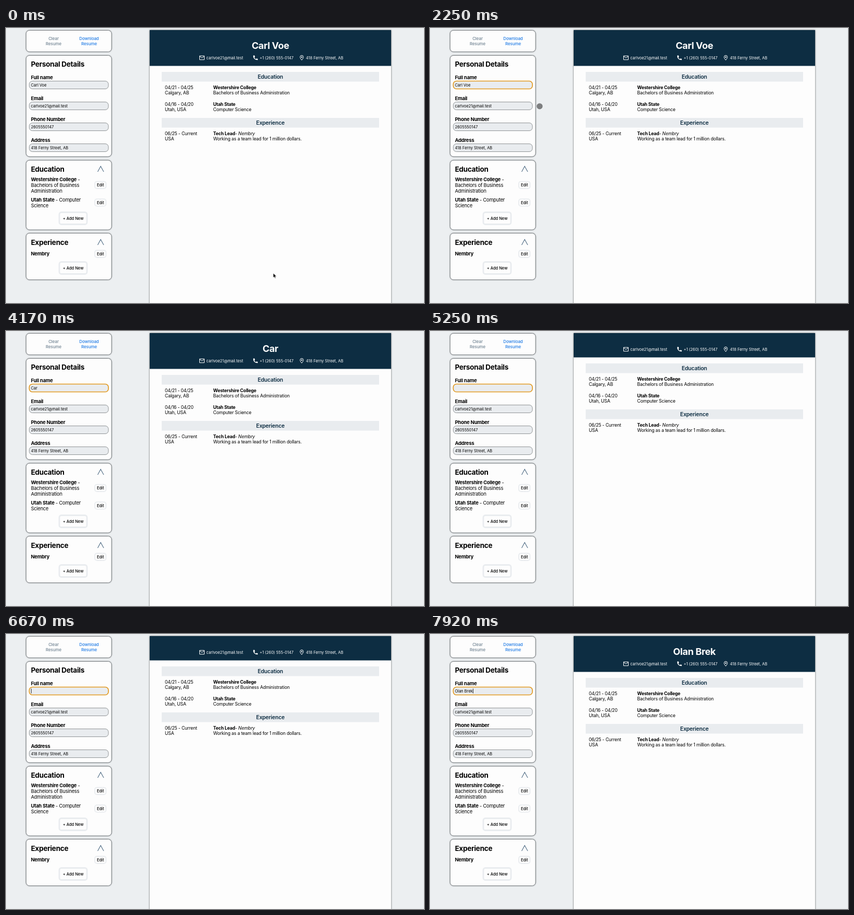
An HTML page that plays this animation: 800 px wide and 526 px high, repeating every 8 s.

```html
<!DOCTYPE html>
<html lang="en">
<head>
<meta charset="utf-8">
<title>Resume builder</title>
<style>
  html, body { margin: 0; width: 100%; height: 100%; overflow: hidden; background: #eceff1; }
  svg { display: block; width: 800px; height: 526px; }
  text { font: 8.7px Inter, sans-serif; letter-spacing: -.02em; font-optical-sizing: none; fill: #000; }
  b, .b { font-weight: 700; }
  .mid { text-anchor: middle; }
  .title { font-size: 13.5px; font-weight: 700; }
  .label { font-size: 9.35px; font-weight: 700; }
  .item { font-size: 9.2px; }
  .small { font-size: 7.45px; letter-spacing: 0; }
  .button { font-size: 7.5px; font-weight: 500; letter-spacing: 0; text-anchor: middle; }
  .action { font-size: 7.95px; font-weight: 500; letter-spacing: -.01em; text-anchor: middle; }
  .section { font-size: 10.4px; font-weight: 600; text-anchor: middle; fill: #0d2d42; }
  #heading { font-size: 18px; font-weight: 700; text-anchor: middle; fill: #fff; }
  .contact text { fill: #fff; }
  .card { fill: #fdfdfd; stroke: #7d8286; filter: drop-shadow(0 .5px 1px #0006); }
  .field { fill: #e9ecef; stroke: #85898c; stroke-width: .9; }
  .focused { stroke: #e29a22; stroke-width: 1.7; }
  .line { fill: none; stroke: #4d6a83; stroke-width: 1.1; }
  .icon { fill: none; stroke: #fff; stroke-width: 1; }
</style>
</head>
<body>
<svg viewBox="0 0 800 526">
  <g id="sidebar"></g>

  <rect x="275" y="4" width="462" height="540" fill="#fdfdfd" style="filter:drop-shadow(0 0 1.6px #000a)"/>
  <rect id="banner" x="275" y="4" width="462" height="68.5" fill="#0d2d42"/>
  <text id="heading" x="506" y="40"></text>

  <g id="content">
    <g class="contact">
      <path class="icon" d="M370.5 53.3h9v7.4h-9zM370.5 54.2l4.5 3 4.5-3"/>
      <path fill="#fff" d="M473.3 52.6h2.4l.8 2.6-1.3 1.3q1 2 3 3l1.3-1.3 2.3.7v2.4q-4 .3-6.500-2.200T473.300 52.600z"/>
      <path class="icon" d="M566 61.400Q562.800 58 562.800 55.600a3.200 3.200 0 0 1 6.400 0Q569.200 58 566 61.400z"/>
      <circle cx="566" cy="55.700" r="1.200" fill="#fff"/>
      <text class="small" x="383.500" y="59.700">carlvoe21@mail.test</text>
      <text class="small" x="485.500" y="59.700">+1 (260) 555-0147</text>
      <text class="small" x="574" y="59.700">418 Ferny Street, AB</text>
    </g>
    <path fill="#e9ecef" d="M298 84h416v18.500h-416zM298 172h416v18.500h-416z"/>
    <text class="section" x="506" y="97.100">Education</text>
    <text x="304" y="116.700">04/21 - 04/25</text>
    <text x="304" y="127">Calgary, AB</text>
    <text class="b" x="396.500" y="116.700">Westershire College</text>
    <text x="396.500" y="127">Bachelors of Business Administration</text>
    <text x="304" y="148.700">04/16 - 04/20</text>
    <text x="304" y="158.900">Utah, USA</text>
    <text class="b" x="396.500" y="148.700">Utah State</text>
    <text x="396.500" y="158.900">Computer Science</text>
    <text class="section" x="506" y="185.100">Experience</text>
    <text x="304" y="204.800">06/25 - Current</text>
    <text x="304" y="215">USA</text>
    <text x="396.500" y="204.800"><tspan class="b">Tech Lead</tspan>- <tspan font-style="italic">Nembry</tspan></text>
    <text x="396.500" y="215">Working as a team lead for 1 million dollars.</text>
  </g>

  <path id="arrow" d="M0 0v8.600l2-1.800 1.300 3 1.400-.6-1.300-2.900h2.700z" stroke="#fff" stroke-width=".6"/>
  <circle id="dot" r="5.500" stroke="#0003" stroke-width=".8"/>
</svg>
<script>
const $ = id => document.getElementById(id);
const text = (cls, x, y, body, extra = '') => `<text class="${cls}" x="${x}" y="${y}" ${extra}>${body}</text>`;
const card = (y, h) => `<rect class="card" x="38.5" y="${y}" width="163.5" height="${h}" rx="6.500"/>`;
const field = (y, label, value, id) =>
  text('label', 47.700, y - 11.400, label) +
  `<rect class="field" id="${id}Box" x="44.500" y="${y - 7.500}" width="151.500" height="15" rx="6"/>` +
  text('small', 47.700, y + 2.700, value, `id="${id}"`);
const button = (cx, cy, w, h, border, label) =>
  `<rect x="${cx - w / 2}" y="${cy - h / 2}" width="${w}" height="${h}" rx="4" fill="#fdfdfd" stroke="#e9ecef" stroke-width="${border}"/>` +
  text('button', cx, cy + 2.700, label);
const edit = y => button(180.700, y, 21.500, 13.500, 1.800, 'Edit');
const add = y => button(128.500, y, 53, 23, 2.800, '+ Add New');
const panelTitle = (y, label) =>
  text('title', 47.700, y + 5, label) +
  `<path class="line" d="M175.500 ${y + 5}l5.700-10.500 5.800 10.500"/>`;
const bold = s => `<tspan class="b">${s}</tspan>`;

$('sidebar').innerHTML = [
  card(4.500, 41),
  text('action', 91, 23.100, 'Clear', 'style="fill:#708392"'),
  text('action', 91, 33, 'Resume', 'style="fill:#708392"'),
  text('action', 159, 23.100, 'Download', 'style="fill:#1f7be5"'),
  text('action', 159, 33, 'Resume', 'style="fill:#1f7be5"'),
  card(52.500, 193.500),
  text('title', 47.700, 74.400, 'Personal Details'),
  field(109, 'Full name', '', 'name'),
  field(149, 'Email', 'carlvoe21@mail.test', 'email'),
  field(189, 'Phone Number', '2605550147', 'phone'),
  field(229, 'Address', '418 Ferny Street, AB', 'address'),
  '<rect id="caret" y="104.500" width=".8" height="9"/>',
  card(253, 133), panelTitle(270, 'Education'),
  text('item', 47.700, 292.800, bold('Westershire College') + ' -'),
  text('item', 47.700, 303.700, 'Bachelors of Business'),
  text('item', 47.700, 314.600, 'Administration'),
  edit(300.300),
  text('item', 47.700, 332, bold('Utah State') + ' - Computer'),
  text('item', 47.700, 342.900, 'Science'),
  edit(333.900), add(364),
  card(392.500, 89), panelTitle(410, 'Experience'),
  text('label', 47.700, 435.300, 'Nembry'),
  edit(432), add(459)
].join('');

const LOOP = 8000, OLD_NAME = 'Carl Voe', NEW_NAME = 'Olan Brek';
const deletions = [3580, 3720, 3860, 4000, 4140, 4420, 4800, 5200];
const TYPE_START = 6750, TYPE_STEP = 140, FOCUS_AT = 1580;
// Pointer waypoints: time, x, y
const pointerPath = [[80, 511.500, 469], [950, 128, 112], [1900, 128, 112], [2900, 417, 245]];

function nameAt(t) {
  if (t >= TYPE_START) return NEW_NAME.slice(0, 1 + Math.floor((t - TYPE_START) / TYPE_STEP));
  return OLD_NAME.slice(0, OLD_NAME.length - deletions.filter(d => t >= d).length);
}

function pointerAt(t) {
  const next = pointerPath.findIndex(p => p[0] > t);
  if (next === 0) return pointerPath[0].slice(1);
  if (next < 0) return pointerPath[pointerPath.length - 1].slice(1);
  const [t0, x0, y0] = pointerPath[next - 1], [t1, x1, y1] = pointerPath[next];
  const u = (t - t0) / (t1 - t0), e = u * u * (3 - 2 * u);
  return [x0 + (x1 - x0) * e, y0 + (y1 - y0) * e];
}

const show = (id, on) => $(id).setAttribute('visibility', on ? 'visible' : 'hidden');

function draw(now) {
  const t = now % LOOP, name = nameAt(t), shift = name ? 0 : -22;
  $('heading').textContent = $('name').textContent = name;
  $('banner').setAttribute('height', 68.500 + shift);
  $('content').setAttribute('transform', `translate(0 ${shift})`);
  $('nameBox').classList.toggle('focused', t >= FOCUS_AT);

  show('caret', t >= TYPE_START || (t > 5550 && (t - 5550) % 1060 < 530));
  $('caret').setAttribute('x', 47.900 + (name ? $('name').getComputedTextLength() : 0));

  const isArrow = t < 950, position = `translate(${pointerAt(t)})`;
  show('arrow', isArrow);
  show('dot', !isArrow && t < 3500);
  $('arrow').setAttribute('transform', position);
  $('dot').setAttribute('transform', position);
  $('dot').setAttribute('fill', t < 1700 ? '#0008' : '#0007');
  requestAnimationFrame(draw);
}
requestAnimationFrame(draw);
</script>
</body>
</html>
```
